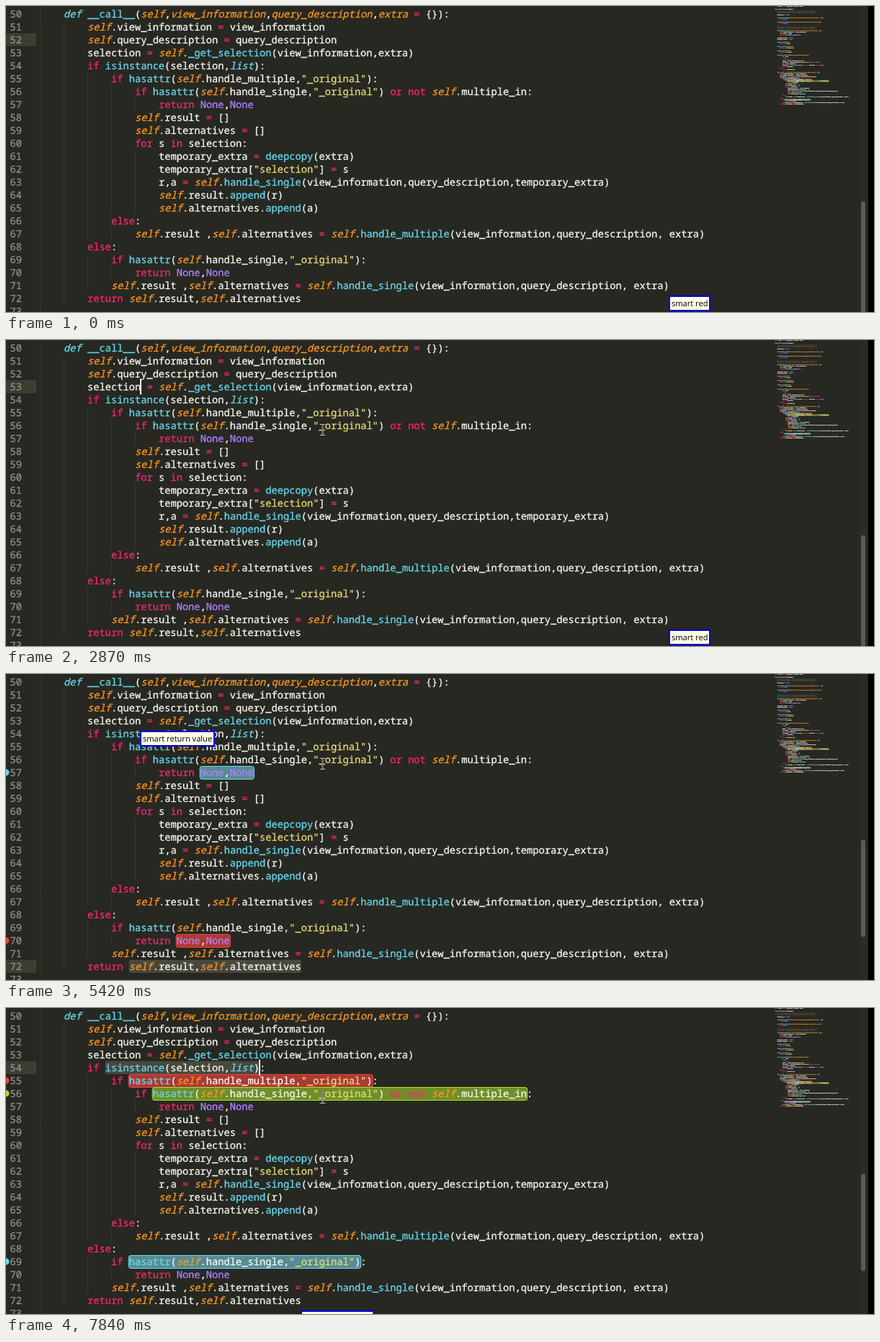
Recreate the animation shown at these times as an HTML page. Size 1205x426 px, loop 8000 ms.

```html
<!DOCTYPE html>
<html lang="en">
<head>
<meta charset="utf-8">
<title>Editor</title>
<style>
html, body { margin: 0; width: 100%; height: 100%; overflow: hidden; background: #272822; }
svg { display: block; width: 1205px; height: 426px; isolation: isolate; }
text, tspan { fill: currentColor; stroke: currentColor; }
text { white-space: pre; text-rendering: geometricPrecision; }
#code, #numbers, #head { font-family: "Noto Sans Mono", "DejaVu Sans Mono", monospace; font-size: 13.745px; color: #f8f8f2; }
#numbers { color: #8f908a; }
#stage { stroke-width: .3px; }
#mini { font-weight: 700; stroke-width: 1.2px; }
.key { color: #f92672; }
.self { color: #fd971f; font-style: italic; }
.type { color: #66d9ef; font-style: italic; }
.call { color: #66d9ef; }
.str { color: #e6db74; }
.const { color: #ae81ff; }
.note { color: #75715e; }
.tip { color: #000; stroke-width: 0; }
.tip text { font: 11.1px "Open Sans", "Liberation Sans", sans-serif; }
#mouse { mix-blend-mode: difference; }
</style>
</head>
<body>
<svg id="stage" viewBox="0 0 1205 426" xmlns="http://www.w3.org/2000/svg">
  <rect width="1205" height="426" fill="#272822"/>
  <rect id="row" width="42" height="18" fill="#3e3d32"/>
  <g id="guides" stroke="#484943" stroke-dasharray="1 1"></g>
  <g id="numbers"></g>
  <g id="marks"></g>
  <g id="code"></g>
  <g id="dots"></g>
  <g id="mini" transform="translate(1061.8 91.2) scale(.11111)">
    <g id="head"></g>
    <use href="#marks"/>
    <use href="#code"/>
  </g>
  <rect x="1186" width="8" height="426" fill="#2b2c26"/>
  <g id="thumbs" fill="#595a54"></g>
  <rect x="1197" width="8" height="426" fill="#000"/>
  <g id="carets" fill="#f8f8f0"></g>
  <g id="tips"></g>
  <circle id="click" cx="185" cy="65" r="12" fill="#ff0" fill-opacity=".47"/>
  <path id="mouse" d="M-3.5 -7.5h3l.5 .5l.5 -.5h3M0 -7V7M-3.5 7.5h3l.5 -.5l.5 .5h3" fill="none" stroke="#fff" style="stroke-width:1px"/>
</svg>
<script>
const LOOP = 8000, CW = 8.247, LEFT = 47, FIRST = 50;
const KEYS = ['if', 'for', 'in', 'return', 'else', 'or', 'not', 'from', 'import', '='];

const code = `    def __call__(self,view_information,query_description,extra = {}):
        self.view_information = view_information
        self.query_description = query_description
        selection = self._get_selection(view_information,extra)
        if isinstance(selection,list):
            if hasattr(self.handle_multiple,"_original"):
                if hasattr(self.handle_single,"_original") or not self.multiple_in:
                    return None,None
                self.result = []
                self.alternatives = []
                for s in selection:
                    temporary_extra = deepcopy(extra)
                    temporary_extra["selection"] = s
                    r,a = self.handle_single(view_information,query_description,temporary_extra)
                    self.result.append(r)
                    self.alternatives.append(a)
            else:
                self.result ,self.alternatives = self.handle_multiple(view_information,query_description, extra)
        else:
            if hasattr(self.handle_single,"_original"):
                return None,None
            self.result ,self.alternatives = self.handle_single(view_information,query_description, extra)
        return self.result,self.alternatives`.split('\n');

// lines 4 to 49, seen only in the overview
const head = `from .tools import get_root, filters, nodes

class SelectionQuery(object):
    # -----------------------------------------------------------
    # the handlers below are to be replaced by the subclasses
    # -----------------------------------------------------------
    multiple_in = False

    def handle_single(self,view_information,query_description,extra = {}):
        return None

    def handle_multiple(self,view_information,query_description,extra):
        return None

    # -----------------------------------------------------------
    # the basic functions shared by all the queries are below
    # -----------------------------------------------------------
    def preliminary(self,view_information,query_description,extra = {}):
        self.view_information = view_information
        self.extra = extra
        return self.handle_single(None)

    indexable_domain = False
    multiple_output = False

    def get_code(self):
        return self.code

    def get_selection(self):
        return self.selection

    def get_result(self):
        return self.result

    def _get_selection(self,view_information,extra):
            s = extra
            if s:
                return s
            build = view_information["build"]
            selection = view_information["selection"] if s else None
            m = build(selection)
            selection = [self.convert(x,m) for x in selection if not None]
            return selection
        else:
            return selection[0]`.split('\n');

const $ = id => document.getElementById(id);

function add(parent, name, attrs, content) {
  const el = document.createElementNS('http://www.w3.org/2000/svg', name);
  for (const k in attrs) el.setAttribute(k, attrs[k]);
  if (content != null) el.textContent = content;
  return parent.appendChild(el);
}

// steps: [ms, value] pairs, each value held until the next
function hold(el, prop, steps) {
  const frames = steps.map(([t, v]) => ({ offset: t / LOOP, [prop]: v, easing: 'step-end' }));
  frames.push({ offset: 1, [prop]: steps[steps.length - 1][1] });
  el.animate(frames, { duration: LOOP, iterations: Infinity });
}

function show(el, from, to = LOOP) {
  const steps = from ? [[0, 0], [from, 1]] : [[0, 1]];
  if (to < LOOP) steps.push([to, 0]);
  hold(el, 'opacity', steps);
  return el;
}

const rowY = n => 2 + 18 * (n - FIRST);
const colX = c => LEFT + c * CW;

function kind(word, next, inDef) {
  if (word[0] === '"') return 'str';
  if (word[0] === '#') return 'note';
  if (KEYS.includes(word)) return 'key';
  if (['def', 'list', 'class'].includes(word)) return 'type';
  if (['None', 'False', '0'].includes(word)) return 'const';
  if (word === 'self') return 'self';
  if (/\w/.test(word)) return next === '(' ? 'call' : inDef ? 'self' : '';
  return '';
}

function drawLine(parent, src, n) {
  const body = src.trimStart();
  if (!body) return;
  const el = add(parent, 'text', { x: colX(src.length - body.length), y: rowY(n) + 14 });
  const inDef = body.startsWith('def ');
  for (const m of body.matchAll(/"[^"]*"|#.*|\w+|=|[^\w"#=]+/g)) {
    const next = body[m.index + m[0].length];
    add(el, 'tspan', { class: kind(m[0], next, inDef) }, m[0]);
  }
}

head.forEach((src, i) => drawLine($('head'), src, 4 + i));
code.forEach((src, i) => {
  const n = FIRST + i;
  drawLine($('code'), src, n);
  for (let c = 0; c < src.search(/\S/); c += 4) {
    const x = Math.round(colX(c)) + .5;
    add($('guides'), 'line', { x1: x, x2: x, y1: rowY(n), y2: rowY(n) + 18 });
  }
});
add($('guides'), 'line', { x1: 47.5, x2: 47.5, y1: 416, y2: 426 });
$('guides').style.strokeWidth = '1px';
for (let n = FIRST; n <= 73; n++) add($('numbers'), 'text', { x: 5.5, y: rowY(n) + 14 }, n);

// highlighted regions: line, first column, length, colours, time shown
const TEAL = ['#578b93', '#66d9ef'], RED = ['#ac3a35', '#e8453f'], GREEN = ['#6f8f28', '#a6e22e'];
[
  [57, 27, 9, TEAL, 4730, 7670],
  [70, 23, 9, RED, 4730, 7670],
  [55, 15, 41, RED, 7670],
  [56, 19, 63, GREEN, 7670],
  [69, 15, 39, TEAL, 7670]
].forEach(([n, c, len, [fill, stroke], from, to]) => {
  const box = { x: colX(c) - .5, y: rowY(n) + .5, width: len * CW + 1, height: 18, rx: 3, fill, stroke, style: 'stroke-width:1px' };
  show(add($('marks'), 'rect', box), from, to);
  show(add($('dots'), 'circle', { cx: 0, cy: rowY(n) + 9, r: 4.5, fill: stroke }), from, to);
});

[[72, 15, 29, 4900, 7670], [54, 11, 26, 7840]].forEach(([n, c, len, from, to]) => {
  const box = { x: colX(c), y: rowY(n), width: len * CW, height: 18, rx: 2, fill: '#49483e' };
  show(add($('marks'), 'rect', box), from, to);
});

hold($('row'), 'transform', [[0, 52], [1470, 53], [4730, 72], [7670, 54]]
  .map(([t, n]) => [t, `translateY(${rowY(n)}px)`]));

show(add($('thumbs'), 'rect', { x: 1187, y: 272, width: 6, height: 160, rx: 2 }), 0, 4730);
show(add($('thumbs'), 'rect', { x: 1187, y: 231, width: 6, height: 135, rx: 2 }), 4730);

// carets: x, line, fading steps
[
  [186, 53, [[0, 0], [1470, 1], [2010, .6], [2095, .3], [2180, 0], [2710, .5], [2870, 1], [3190, .5], [3260, 0],
    [3650, .3], [3725, .6], [3800, 1], [4180, .6], [4260, .3], [4340, 0]]],
  [409, 72, [[0, 0], [4900, 1], [5280, .6], [5350, .3], [5420, 0], [5970, .5], [6050, 1], [6430, .5], [6510, 0],
    [6980, .3], [7060, .6], [7140, 1], [7600, 0]]],
  [351, 54, [[0, 0], [7840, 1]]]
].forEach(([x, n, steps]) => {
  hold(add($('carets'), 'rect', { x, y: rowY(n) - 2, width: 2, height: 22 }), 'opacity', steps);
});

// tooltips: x, y, width, label, time shown
[
  [920, 403, 58, 'smart red', 0, 3190],
  [186, 79, 58, 'smart red', 3950, 4490],
  [186, 79, 104, 'smart return value', 4490, 6430],
  [409, 421, 104, 'smart return value', 6430, 7140],
  [409, 421, 102, 'smart return value', 7140]
].forEach(([x, y, w, label, from, to]) => {
  const tip = add($('tips'), 'g', { class: 'tip' });
  add(tip, 'rect', { x, y, width: w, height: 22, fill: '#0000e6' });
  add(tip, 'rect', { x: x + 2, y: y + 2, width: w - 4, height: 18, fill: '#ffffe8' });
  add(tip, 'text', { x: x + 4, y: y + 15 }, label);
  show(tip, from, to);
});

show($('click'), 1470, 1630);
show($('mouse'), 110);
hold($('mouse'), 'transform', [
  [0, 931, 370], [170, 850, 338], [230, 750, 300],
  [390, 690, 272], [467, 610, 236], [544, 520, 196], [621, 430, 158], [698, 350, 124], [775, 290, 98],
  [852, 245, 78], [929, 215, 64], [1006, 199, 56], [1083, 191, 60], [1160, 188, 66],
  [2010, 290, 92], [2095, 400, 118], [2180, 439, 125]
].map(([t, x, y]) => [t, `translate(${x + .5}px, ${y}px)`]));
</script>
</body>
</html>
```
